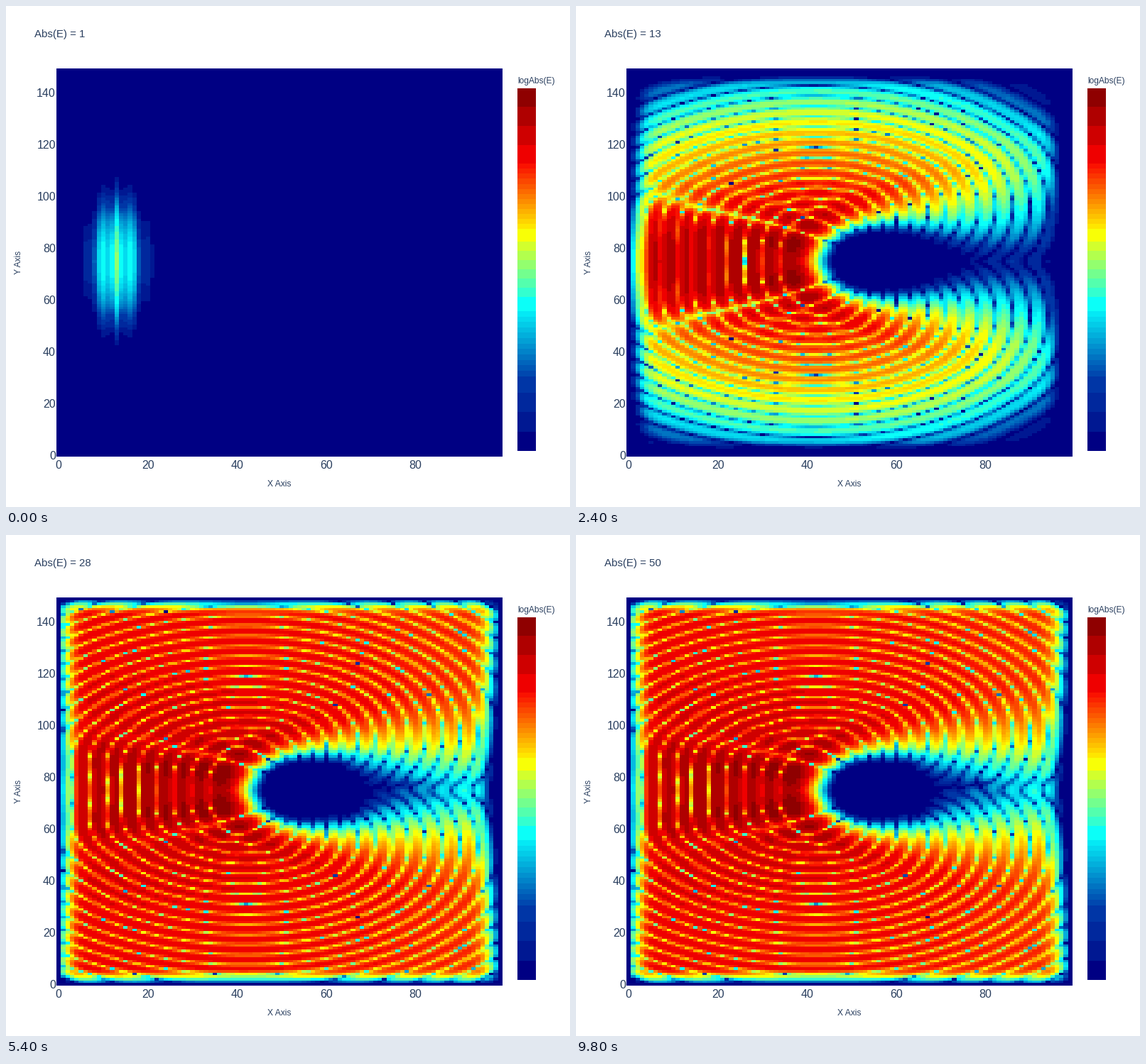
Write a matplotlib script that moves like this. It is 794 px wide and 706 px high and loops after 10 s.

```python
import numpy as np
import matplotlib.pyplot as plt
from matplotlib.animation import FuncAnimation

W, H, DPI = 794, 706, 100
NX, NY = 100, 150
FRAMES, STEP_MS = 50, 200
LEFT, RIGHT, TOP, BOTTOM = 71, 699, 88, 635
BAR = (720, 746, 627, 116)
INK = "#2a3f5f"

# --- colour scale: six stops, shown in uneven bands ---
STOPS = np.array([(0, 0, 131), (0, 60, 170), (5, 255, 255),
                  (255, 255, 0), (250, 0, 0), (128, 0, 0)]) / 255
band_px = np.concatenate([
    [627, 600, 572, 545], np.linspace(522, 430, 13),
    np.linspace(410, 332, 7), np.linspace(314, 222, 14),
    [196, 169, 142, 116]])
edges = (band_px[0] - band_px) / (band_px[0] - band_px[-1])
mids = (edges[1:] + edges[:-1]) / 2
bands = np.stack([np.interp(mids, np.linspace(0, 1, 6), STOPS[:, c])
                  for c in range(3)], axis=1)
bands[0] = STOPS[0]


def paint(level):
    return bands[np.digitize(level, edges[1:-1])]


# --- wave field: beam hitting a dense round plasma, absorbing borders ---
PERIOD, DT = 8.0, 0.4
OMEGA = 2 * np.pi / PERIOD
STEPS = round(PERIOD / DT)
LEAD = 4
RISE, RISE_POWER = 62.0, 2.7
SOURCE_X = 13
CENTER_X, CENTER_Y = 52, 75
DENSITY, SPREAD = 14, 80
EDGE, EDGE_LOSS = 8, 3.6
DECADES, PEAK = 5.0, 1.5


def border(pos, n):
    depth = np.clip(EDGE - np.minimum(pos, n - 1 - pos), 0, None)
    loss = EDGE_LOSS * (depth / EDGE) ** 2 * DT / 2
    return (1 - loss) / (1 + loss), DT / (1 + loss)


def simulate():
    x, y = np.arange(NX), np.arange(NY)
    ax_, bx = border(x, NX)
    ay, by = (v[:, None] for v in border(y, NY))
    axh, bxh = border(x[:-1] + 0.5, NX)
    ayh, byh = (v[:, None] for v in border(y[:-1] + 0.5, NY))

    r2 = (x[None, :] - CENTER_X) ** 2 + (y[:, None] - CENTER_Y) ** 2
    plasma = DENSITY * OMEGA ** 2 * np.exp(-r2 / SPREAD)
    beam = np.exp(-(y - CENTER_Y) ** 2 / 200)

    ex, ey, cur = (np.zeros((NY, NX)) for _ in range(3))
    hx, hy = np.zeros((NY - 1, NX)), np.zeros((NY, NX - 1))
    shots = []
    for n in range(1, LEAD + FRAMES * STEPS + 1):
        e = ex + ey
        hx = ayh * hx - byh * np.diff(e, axis=0)
        hy = axh * hy + bxh * np.diff(e, axis=1)
        cur += DT * plasma * e
        ex[:, 1:-1] = ax_[1:-1] * ex[:, 1:-1] + bx[1:-1] * np.diff(hy, axis=1)
        ey[1:-1] = ay[1:-1] * ey[1:-1] - by[1:-1] * np.diff(hx, axis=0)
        ex[:, 1:-1] -= DT * cur[:, 1:-1]
        t = (n - 0.5) * DT
        ramp = 1 - np.exp(-(t / RISE) ** RISE_POWER)
        ex[:, SOURCE_X] += DT * 2 * OMEGA * ramp * np.sin(OMEGA * t) * beam
        if n > LEAD and (n - LEAD) % STEPS == 0:
            size = np.abs(ex + ey) + 1e-12
            shots.append(1 + np.log10(size / PEAK) / DECADES)
    return shots


levels = simulate()

# --- stage ---
fig = plt.figure(figsize=(W / DPI, H / DPI), dpi=DPI, facecolor="white")
ax = fig.add_axes([0, 0, 1, 1])
ax.axis("off")


def label(x, y, text, px, **kw):
    kw = {"va": "baseline", **kw}
    return ax.text(x, y, text, fontsize=px * 72 / DPI, color=INK,
                   family="Liberation Sans", **kw)


def picture(rgb, box):
    return ax.imshow(rgb, extent=box, origin="lower",
                     interpolation="nearest", aspect="auto")


field = picture(paint(levels[0]), (LEFT, RIGHT, BOTTOM, TOP))
picture(paint(np.linspace(0, 1, 511))[:, None], BAR)
ax.set_xlim(0, W)
ax.set_ylim(H, 0)

for v in range(0, 100, 20):
    label(LEFT + (v + 0.5) * (RIGHT - LEFT) / NX, 652, str(v), 16, ha="center")
for v in range(0, 150, 20):
    label(70, BOTTOM - (v + 0.5) * (BOTTOM - TOP) / NY + 5.8, str(v), 16,
          ha="right")
label(384.5, 677, "X Axis", 12, ha="center")
label(18, 361.5, "Y Axis", 12, ha="center", va="center", rotation=90)
label(720, 109, "logAbs(E)", 12)
title = label(40, 44, "", 15)


def draw(i):
    field.set_data(paint(levels[i]))
    title.set_text(f"Abs(E) = {i + 1}")
    return field, title


anim = FuncAnimation(fig, draw, frames=FRAMES, interval=STEP_MS,
                     repeat=True, repeat_delay=0, blit=False)
plt.show()
```
